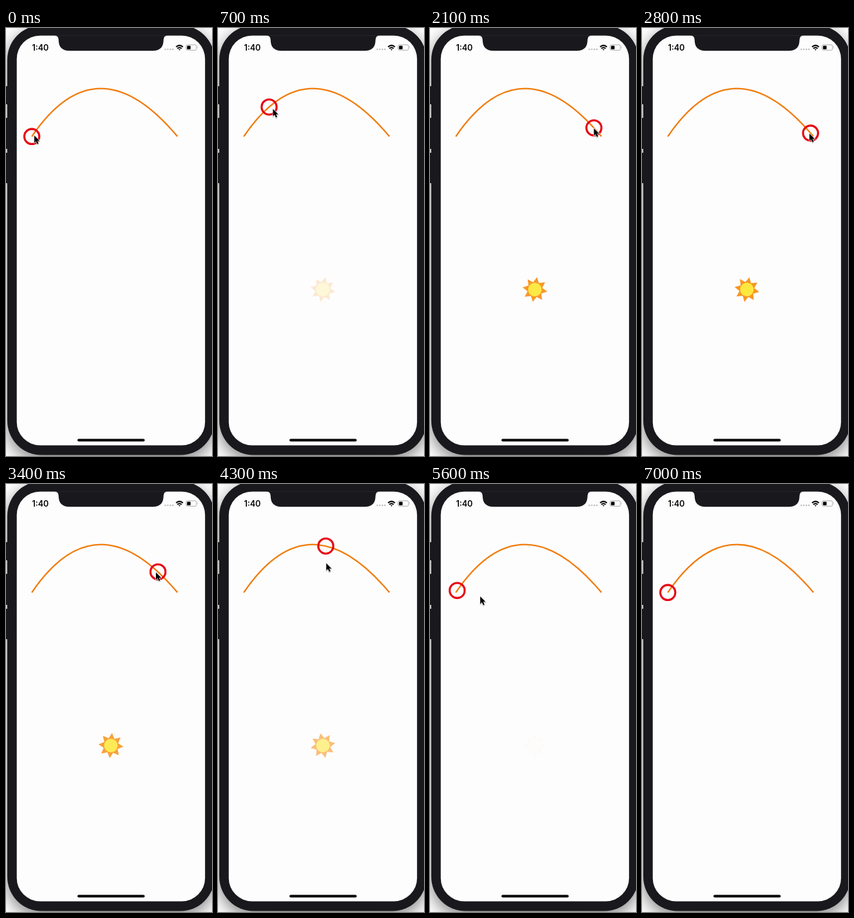
Write an HTML page that moves like this. It is 320 px wide and 662 px high and loops after 7500 ms.

```html
<!DOCTYPE html>
<html lang="en">
<head>
<meta charset="utf-8">
<title>Sunrise slider</title>
<style>
  html, body { margin: 0; width: 100%; height: 100%; overflow: hidden; background: #fff; }
  svg { display: block; }
  .body { fill: #19191d; filter: drop-shadow(0 8px 13px rgba(0, 0, 0, .5)); }
  text { font: 600 12.5px Inter, Arial, sans-serif; }
  #cursor { filter: drop-shadow(0 1px 1px rgba(0, 0, 0, .35)); }
</style>
</head>
<body>
<svg width="320" height="662" viewBox="0 0 320 662">
  <!-- Phone -->
  <rect class="body" x="2" y="-4" width="322" height="664.500" rx="53"/>
  <path d="M0 90h3v28H0zM0 139h3v48H0zM0 193h3v47H0z" fill="#19191d"/>
  <rect x="16.700" y="11.800" width="292.500" height="633.600" rx="36" fill="#fefdfe"/>
  <path d="M74.700 11.300q7 .5 7 7q0 17 17 17h129q17 0 17-17q0-6.500 7-7z" fill="#19191d"/>
  <rect x="111" y="635.500" width="104.500" height="4" rx="2"/>

  <!-- Status bar -->
  <text x="40.500" y="34.500">1:40</text>
  <path d="M247.500 33h12.500" stroke="#bbb" stroke-width="2.400" stroke-linecap="round" stroke-dasharray="0 3.900"/>
  <g fill="none" stroke="#000" stroke-width="2">
    <path d="M264.200 29.200q5.300-4.600 10.600 0M266.200 31.700q3.300-2.800 6.600 0"/>
    <path d="M267.800 32.800h3.400l-1.700 2z" fill="#000" stroke="none"/>
  </g>
  <rect x="279.700" y="26" width="16.300" height="8.300" rx="2.300" fill="none" stroke="#aaa"/>
  <rect x="281.200" y="27.400" width="5.500" height="5.500" rx="1"/>
  <path d="M297.300 28.500q1.500 1.600 0 3.300z" fill="#aaa"/>

  <!-- Scene, in screen points (375 wide) -->
  <g transform="translate(16.700 11.800) scale(.78)">
    <path d="M30 200Q160 10 320 200" fill="none" stroke="#f07c0b" stroke-width="3"/>
    <g id="sun">
      <polygon id="rays" fill="#f8951f"/>
      <circle r="13.500" fill="#ffe83d"/>
    </g>
    <circle id="ring" r="15" fill="none" stroke="#e60612" stroke-width="4"/>
    <path id="cursor" d="M0 0V14.500L3.400 11.500L5.800 17L8.500 15.800L6 10.500H10.500Z" stroke="#fff" stroke-width="1.600" paint-order="stroke"/>
  </g>
</svg>
<script>
const LOOP = 7500, STEP = 100;
const [sun, rays, ring, cursor] = ['sun', 'rays', 'ring', 'cursor'].map(id => document.getElementById(id));

// Pointer drift away from the ring: time, dx, dy
const drift = [[0, 5, -2], [1300, 10, 9], [2100, 0, 1], [3400, -4, 1], [4300, 1, 34], [5600, 46, 12], [LOOP, 46, 12]];

rays.setAttribute('points', Array.from({ length: 16 }, (_, i) => {
  const a = i * Math.PI / 8, r = i % 2 ? 15 : 25;
  return [r * Math.sin(a), -r * Math.cos(a)];
}).join(' '));

const clamp = v => Math.max(0, Math.min(1, v));
const span = (t, from, to) => clamp((t - from) / (to - from));

// Drag out along the arc, then back: slowly at first, settling at the start
function progress(t) {
  const turn = .588;
  if (t < 2500) return (1 - Math.cos(Math.PI * span(t, 0, 2440))) / 2;
  if (t < 4300) return 1 - (1 - turn) * span(t, 2500, 4300) ** 1.75;
  return turn * (1 - span(t, 4300, 5800)) ** 2;
}

function driftAt(t) {
  const i = drift.findIndex(k => k[0] > t), a = drift[i - 1], b = drift[i];
  const f = span(t, a[0], b[0]);
  return [1, 2].map(n => a[n] + (b[n] - a[n]) * f);
}

function set(el, transform, opacity = 1) {
  el.setAttribute('transform', transform);
  el.setAttribute('opacity', opacity);
}

function draw(now) {
  const t = Math.floor(now % LOOP / STEP) * STEP;
  const p = progress(t), [dx, dy] = driftAt(t);
  const x = 30 + 260 * p + 30 * p * p, y = 200 - 380 * p * (1 - p);
  set(sun, `translate(187.5 503.5) rotate(${p * 180 / Math.PI})`, p);
  set(ring, `translate(${x} ${y})`);
  set(cursor, `translate(${x + dx} ${y + dy})`, 1 - span(t, 6300, 6600));
}

const start = performance.now();
(function tick() {
  draw(performance.now() - start);
  requestAnimationFrame(tick);
})();
</script>
</body>
</html>
```
